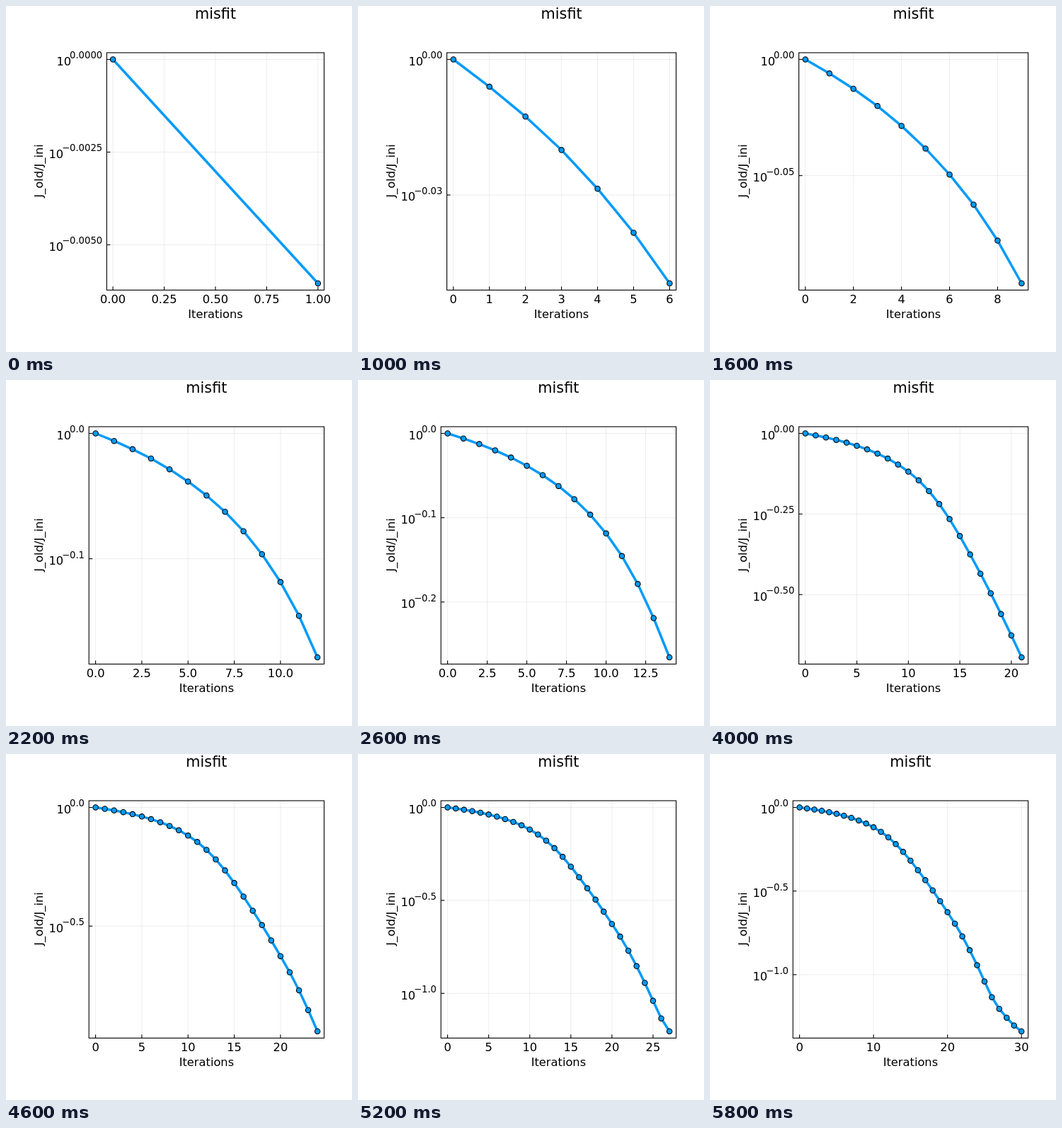
An HTML page that plays this animation: 489x489 px, repeating every 6000 ms.

```html
<!DOCTYPE html>
<html lang="en">
<head>
<meta charset="utf-8">
<title>misfit</title>
<style>
  html, body { margin: 0; width: 100%; height: 100%; overflow: hidden; background: #fff; }
  svg { display: block; width: 100vw; height: 100vh; }
  text { font-family: "DejaVu Sans", sans-serif; font-size: 16.3px; text-anchor: middle; }
  .title { font-size: 20.8px; }
  .ylabel { text-anchor: end; }
  .power { font-size: 13.2px; }
  .grid { stroke: #000; stroke-opacity: .1; stroke-width: .75; }
  .axis { fill: none; stroke: #000; stroke-width: 1.1; }
  .curve { fill: none; stroke: #009af9; stroke-width: 3.5; stroke-linejoin: round; }
  circle { fill: #009af9; stroke: #000; stroke-width: 1.1; }
</style>
</head>
<body>
<svg id="plot" viewBox="0 0 489 489"></svg>
<script>
const FRAME_MS = 200;
const TOP = 66, BOTTOM = 401.5, RIGHT = 449.6;
const PAD = 0.03;

// log10 of the relative misfit, sign dropped, per iteration
const misfit = [
  0, .00604, .01263, .02005, .0286, .03835, .04955, .0625, .078, .0964, .1186,
  .1455, .1787, .2191, .2657, .3184, .3755, .435, .496, .5605, .6266,
  .6947, .7706, .8538, .9436, 1.0402, 1.1346, 1.2045, 1.2574, 1.304, 1.339
];

const niceness = [[5, .9], [3, .2], [2.5, .5], [2, .7], [1, 1]];
const steps = [];
for (let z = 2; z >= -4; z--)
  for (const [q, score] of niceness) steps.push([q * 10 ** z, score]);

// Picks the step with the best mix of tick count, coverage and round numbers.
function bestStep(extent, minCount, maxCount) {
  const span = extent * (1 + 2 * PAD), limit = extent * (1 + PAD);
  let best = 0, high = -Infinity;
  for (const [step, nice] of steps) {
    const count = Math.floor(limit / step + 1e-9) + 1;
    const cover = (Math.ceil(limit / step) + 1) * step;
    if (count < minCount || count > maxCount || cover >= 2 * span) continue;
    const score = (1 - Math.abs(count - 5) / 5) / 4 + span / ((count - 1) * step) / 2 + nice / 4;
    if (score > high + 1e-9) { high = score; best = step; }
  }
  return best;
}

function ticks(extent, step) {
  const list = [];
  for (let i = 0; i * step <= extent * (1 + PAD) + 1e-9; i++) list.push(i * step);
  return list;
}

function decimals(step) {
  let d = 0;
  while (Math.abs(step * 10 ** d - Math.round(step * 10 ** d)) > 1e-6) d++;
  return d;
}

const line = (x1, y1, x2, y2, cls) =>
  `<line class="${cls}" x1="${x1}" y1="${y1}" x2="${x2}" y2="${y2}"/>`;
const label = (x, y, str, cls = "") => `<text class="${cls}" x="${x}" y="${y}">${str}</text>`;

function draw(n) {
  const xStep = bestStep(n, 4, 8), yStep = bestStep(misfit[n], 2, 6);
  const xDigits = decimals(xStep), yDigits = Math.max(1, decimals(yStep));
  const left = 117.2 + 8.4 * (yDigits - 1);
  const middle = (left + RIGHT) / 2;
  const place = (v, extent, from, to) => from + (to - from) * (v / extent + PAD) / (1 + 2 * PAD);
  const px = v => place(v, n, left, RIGHT);
  const py = v => place(v, misfit[n], TOP, BOTTOM);

  let grid = "", marks = "", labels = "";
  for (const v of ticks(n, xStep)) {
    const x = px(v);
    grid += line(x, TOP, x, BOTTOM, "grid");
    marks += line(x, BOTTOM, x, BOTTOM - 5, "axis");
    labels += label(x, 420, v.toFixed(xDigits));
  }
  for (const v of ticks(misfit[n], yStep)) {
    const y = py(v);
    const power = (v ? "\u2212" : "") + v.toFixed(yDigits);
    grid += line(left, y, RIGHT, y, "grid");
    marks += line(left, y, left + 5, y, "axis");
    labels += label(left - 6.2, y + 8.3,
      `10<tspan class="power" dx="-2.2" dy="-9.4">${power}</tspan>`, "ylabel");
  }

  const points = misfit.slice(0, n + 1).map((v, i) => [px(i), py(v)]);
  const dots = points.map(([x, y]) => `<circle cx="${x}" cy="${y}" r="3.7"/>`).join("");

  return grid +
    `<rect class="axis" x="${left}" y="${TOP}" width="${RIGHT - left}" height="${BOTTOM - TOP}"/>` +
    marks + labels +
    label(middle, 18, "misfit", "title") +
    label(middle, 441, "Iterations") +
    `<text transform="translate(52 233) rotate(-90)">J_old/J_ini</text>` +
    `<polyline class="curve" points="${points.join(" ")}"/>` + dots;
}

const plot = document.getElementById("plot");
let shown = 0;

function update() {
  const n = Math.floor(performance.now() / FRAME_MS) % (misfit.length - 1) + 1;
  if (n !== shown) plot.innerHTML = draw(shown = n);
  requestAnimationFrame(update);
}
update();
</script>
</body>
</html>
```
